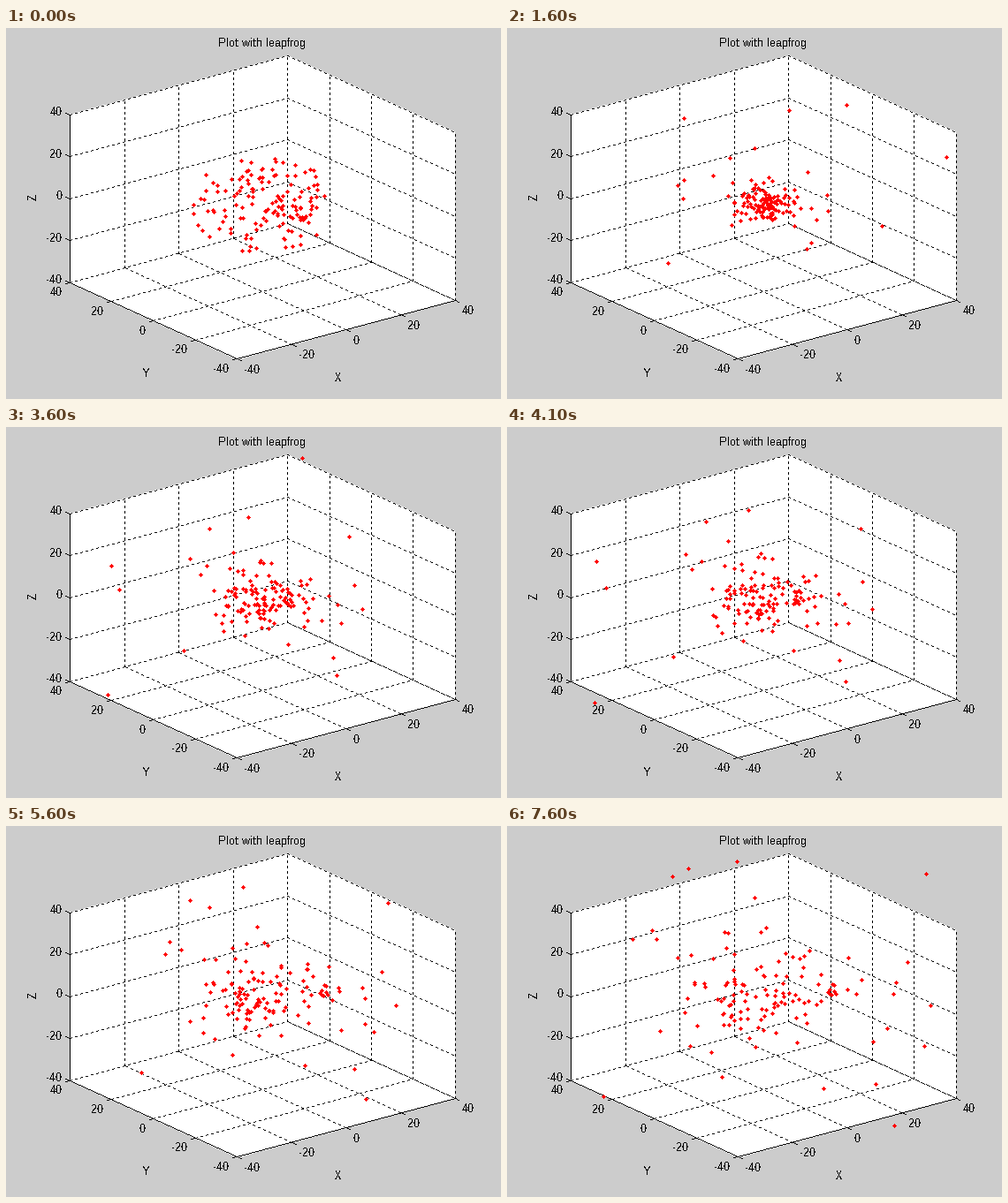
A matplotlib script for the animation above (8 s loop, 560 by 420 pixels).

```python
import matplotlib.pyplot as plt
import numpy as np
from matplotlib.animation import FuncAnimation

W, H, DPI = 560, 420, 100
PX = 72 / DPI  # one pixel in points
plt.rcParams.update({
    "font.family": "Liberation Sans",
    "text.antialiased": False,
    "text.hinting": "default",
    "text.hinting_factor": 1,
})

# Pixel vectors of one data unit along each axis, and the middle of the box
AXES = np.array([[246.5, -66.5], [-189, -86.5], [0, -190]]) / 80
MIDDLE = np.array([289.75, 202.8])
L = 40
TICKS = range(-L, L + 1, 20)
BLACK, RED = (0, 0, 0, 255), (255, 0, 0, 255)

N, N_CLUMP = 142, 10
rng = np.random.default_rng(11)


def project(x, y, z):
    return MIDDLE + np.array([x, y, z]) @ AXES


# Every body starts in a ball, then leaves a tight core at its own speed
heading = rng.normal(size=(N, 3))
heading /= np.linalg.norm(heading, axis=1, keepdims=True)
start = MIDDLE - (0, 3) + heading * 21 * rng.random((N, 1)) ** (1 / 3) @ AXES
core_r = rng.uniform(1, 8, N)
speed = rng.lognormal(np.log(1.7), 0.95, N)
launch = rng.uniform(-2, 5, N)
spin = 0.5 * np.exp(-speed)
clump = rng.normal(0, 7, (N_CLUMP, 2))


def ease(t):
    t = min(max(t, 0), 1)
    return t * t * (3 - 2 * t)


def bodies(step):
    if step == 0:
        return start
    r = core_r + speed * np.maximum(step - launch, 0) ** 0.87
    c, s = np.cos(spin * step), np.sin(spin * step)
    x, y, z = heading.T
    turned = np.stack([c * x - s * y, s * x + c * y, z], axis=1)
    drift = ease((step - 4) / 10)
    pts = MIDDLE - (0, 2 + 8 * drift) + turned * r[:, None] @ AXES
    pts[:N_CLUMP] = clump + (294 + 75 * drift, 200 - 13 * drift)
    return pts


def pixel_line(img, a, b, dash=0):
    """One pixel wide line; dash is the length of each stroke and gap."""
    a, b = np.round(a), np.round(b)
    n = int(abs(b - a).max()) + 1
    x, y = np.round(np.linspace(a, b, n)).astype(int).T
    on = np.arange(n) // dash % 2 == 0 if dash else slice(None)
    img[y[on], x[on]] = BLACK


def pixel_dots(img, pts):
    x, y = np.round(pts).astype(int).T
    seen = (x >= 72) & (x <= 508) & (y >= 31) & (y <= 374)
    x, y = x[seen], y[seen]
    for dx in range(-2, 3):
        for dy in range(abs(dx) - 2, 3 - abs(dx)):
            img[y + dy, x + dx] = RED


fig = plt.figure(figsize=(W / DPI, H / DPI), dpi=DPI, facecolor="#cccccc")
ax = fig.add_axes([0, 0, 1, 1])


def label(x, y, s, ha="center", rotation=0):
    ax.text(x, y, s, size=13 * PX, ha=ha, va="center_baseline",
            rotation=rotation, color="black")


walls = [(-L, L, L), (L, L, L), (L, -L, L), (L, -L, -L), (-L, -L, -L), (-L, L, -L)]
ax.fill(*zip(*[project(*p) for p in walls]), color="white", lw=0, aa=False)

grid = np.zeros((H, W, 4), np.uint8)
for t in TICKS:
    for a, b in [((t, L, -L), (t, L, L)), ((L, t, -L), (L, t, L)),
                 ((-L, L, t), (L, L, t)), ((L, L, t), (L, -L, t)),
                 ((t, -L, -L), (t, L, -L)), ((-L, t, -L), (L, t, -L))]:
        pixel_line(grid, project(*a), project(*b), dash=3)

corner = project(-L, -L, -L)
pixel_line(grid, project(-L, L, L), project(-L, L, -L))
pixel_line(grid, project(-L, L, -L), corner)
pixel_line(grid, corner, project(L, -L, -L))

# Tick direction, label offset and alignment for each axis
for t in TICKS:
    for p, tick, offset, ha in [
        (project(t, -L, -L), (5, 2), (8, 11), "left"),
        (project(-L, t, -L), (-5, 1), (-9, 10), "right"),
        (project(-L, L, t), (-5, -2), (-9, -4), "right"),
    ]:
        pixel_line(grid, p, p + tick)
        label(*(p + offset), str(t), ha)

label(288.5, 16, "Plot with leapfrog")
label(374.5, 394.5, "X")
label(158, 390, "Y")
label(30.5, 193, "Z", rotation=90)

view = ax.imshow(grid, extent=(-0.5, W - 0.5, H - 0.5, -0.5),
                 interpolation="nearest", aspect="auto", zorder=2)
ax.set_xlim(-0.5, W - 0.5)
ax.set_ylim(H - 0.5, -0.5)
ax.axis("off")


def draw(i):
    img = grid.copy()
    pixel_dots(img, bodies((i + 4) // 5))
    view.set_data(img)
    return view,


anim = FuncAnimation(fig, draw, frames=80, interval=100, repeat=True,
                     repeat_delay=0, blit=False)
plt.show()
```
